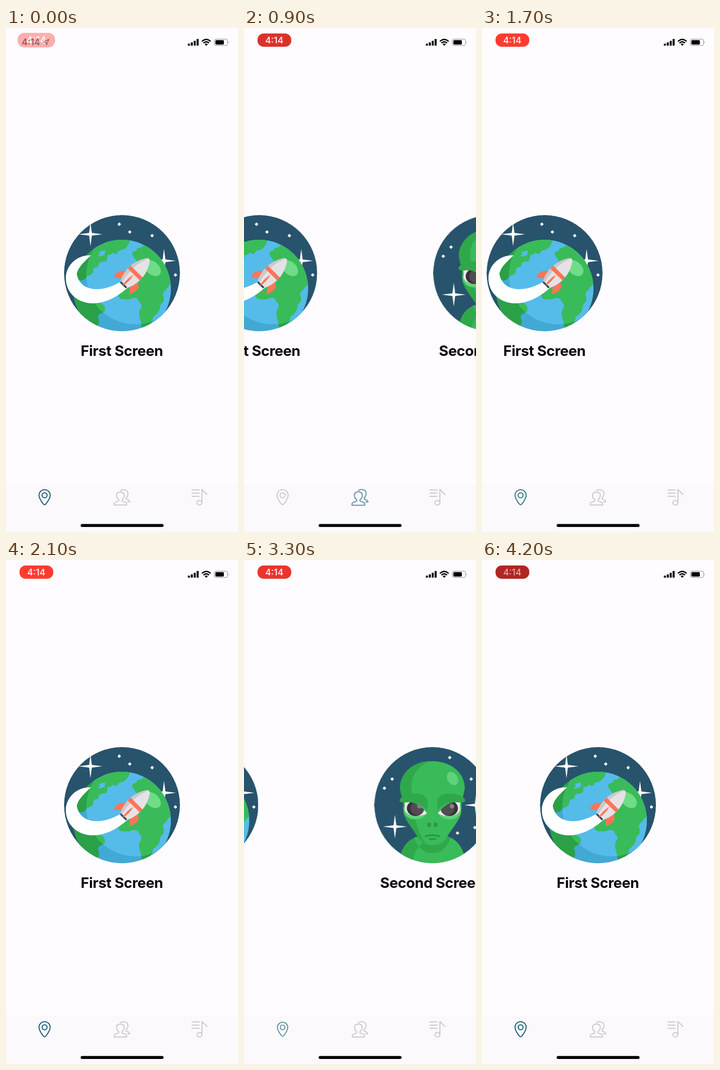
Write an HTML page that moves like this. It is 508 px wide and 1102 px high and loops after 4.3 s.

```html
<!DOCTYPE html>
<html lang="en">
<head>
<meta charset="utf-8">
<title>Tab screens</title>
<style>
html, body { margin: 0; height: 100%; overflow: hidden; background: #fefcff; }
svg { display: block; width: 100vw; height: 100vh; }
text { font-family: Inter, "Liberation Sans", sans-serif; text-anchor: middle; }
.title { font-size: 31.6px; font-weight: 700; letter-spacing: -.42px; fill: #08060b; }
.time { font-size: 19.6px; font-weight: 500; }

#strip { animation: slide 4.3s infinite; }
@keyframes slide {
  0%, 18.88% { transform: translateX(0); }
  26.8%, 35.9% { transform: translateX(-508px); }
  43.7%, 55.2% { transform: translateX(0); }
  63%, 73.75% { transform: translateX(-1016px); }
  81.65%, 100% { transform: translateX(0); }
}

.icon {
  --on: #07536a; --off: #c6c5ca; --press: #ededf1;
  fill: none; stroke: currentColor; stroke-width: 2;
  stroke-linecap: round; stroke-linejoin: round; color: var(--off);
  transform-box: fill-box; transform-origin: center;
  animation: 4.3s cubic-bezier(.2, .6, .4, 1) infinite;
}
#pin { animation-name: pin; }
#people { animation-name: people; }
#music { animation-name: music; animation-timing-function: linear; }
@keyframes pin {
  0%, 18.6% { color: var(--on); transform: scale(1); }
  18.7%, 32% { color: var(--off); transform: scale(1); }
  33.5%, 35.8% { color: var(--press); transform: scale(1); }
  43.7%, 55.2% { color: var(--on); transform: scale(1); }
  55.3%, 71% { color: var(--off); transform: scale(1); }
  72.5%, 73.4% { color: var(--press); transform: scale(1); }
  76.7% { color: #4a8490; transform: scale(.93); }
  81.4%, 100% { color: var(--on); transform: scale(1); }
}
@keyframes people {
  0%, 15% { color: var(--off); transform: scale(1); }
  16.5%, 18.6% { color: var(--press); transform: scale(1); }
  20.9% { color: #5a8a9c; transform: scale(1.03); }
  26.5%, 35.8% { color: var(--on); transform: scale(1); }
  35.9%, 100% { color: var(--off); transform: scale(1); }
}
@keyframes music {
  0%, 52.5% { color: var(--off); transform: scale(1); }
  54%, 55.2% { color: var(--press); transform: scale(1); }
  62.8% { color: #3f6076; transform: scale(1.05); }
  66%, 73.4% { color: var(--on); transform: scale(1); }
  73.5%, 100% { color: var(--off); transform: scale(1); }
}

#pill { transform-origin: 66.5px 26.5px; animation: enter 4.3s linear infinite; }
#pill rect { animation: glow 4.3s linear infinite; }
#pill text { animation: dim 4.3s linear infinite; }
#clock { animation: leave 4.3s linear infinite; }
@keyframes enter {
  0% { opacity: .4; transform: scale(1.11); }
  4.7%, 100% { opacity: 1; transform: none; }
}
@keyframes leave { 0% { opacity: .45; } 3.5%, 100% { opacity: 0; } }
@keyframes glow {
  0%, 9% { fill: #ff3b30; }
  20.9% { fill: #da322a; }
  34.9%, 49% { fill: #ff3b30; }
  62.8% { fill: #da322a; }
  76.7% { fill: #e8362d; }
  97.7%, 100% { fill: #b02621; }
}
@keyframes dim { 0%, 77% { fill: #fff; } 97.7%, 100% { fill: #d2b3b3; } }
</style>
</head>
<body>
<svg viewBox="0 0 508 1102">
<defs>
  <clipPath id="disc"><circle cx="254" cy="536" r="127"/></clipPath>
  <clipPath id="globe"><circle cx="254" cy="570" r="107"/></clipPath>
  <clipPath id="lit"><circle cx="283" cy="541" r="107"/></clipPath>
  <clipPath id="eye"><path d="M193 528C207 527 226 532 242 554C226 563 202 562 194 548Z"/></clipPath>
  <circle id="sky" cx="254" cy="536" r="127" fill="#28536c"/>
  <path id="star" fill="#fff" d="M0-26L3-3 26 0 3 3 0 26-3 3-26 0-3-3Z"/>
  <path id="dot" fill="#fff" d="M0-3.9L3.9 0 0 3.9-3.9 0Z"/>
  <g id="land">
    <path d="M140 545V455H275L271 466Q266 481 256 485Q246 486 244 492Q239 497 234 491L228 496Q221 494 222 501Q221 512 215 510Q206 511 203 515Q204 523 197 523Q190 524 191 533Q187 541 178 542Q172 552 163 552Z"/>
    <path d="M305 470Q298 482 288 481Q286 488 278 489Q274 494 279 500L286 510 262 556 248 572Q243 580 248 590Q252 594 262 593Q270 595 275 591Q288 587 291 598Q300 606 295 613Q289 622 293 634Q297 645 297 657L311 653Q321 645 322 632Q333 625 337 614Q336 605 345 598Q347 590 343 583Q345 575 351 572Q354 564 364 560V470Z"/>
    <path d="M140 580L160 585 200 600Q210 601 215 607Q219 615 214 621L204 626Q199 630 203 636Q206 642 201 652L190 670H140Z"/>
  </g>
  <g id="eyeSide">
    <path fill="#5fd27c" d="M191 540C190 557 200 567 217 567C229 567 238 561 242 553Z"/>
    <g clip-path="url(#eye)">
      <rect x="188" y="520" width="60" height="50" fill="#f1eef2"/>
      <ellipse cx="217" cy="543" rx="19" ry="17" fill="#353136"/>
      <ellipse cx="221" cy="543" rx="15" ry="15" fill="#514c51"/>
    </g>
    <path fill="#2fa84b" d="M182 526C184 518 191 515 200 513C219 508 237 511 242 522C245 529 244 538 242 547C232 533 212 529 198 530C190 531 183 530 182 526Z"/>
  </g>
</defs>

<rect width="508" height="1102" fill="#fefcff"/>

<g id="strip">
  <g>
    <g clip-path="url(#disc)">
      <use href="#sky"/>
      <use href="#star" x="185" y="451"/>
      <use href="#star" x="346" y="509"/>
      <use href="#dot" x="248" y="429"/>
      <use href="#dot" x="271" y="446"/>
      <use href="#dot" x="320" y="454"/>
      <use href="#dot" x="371" y="540"/>
      <g clip-path="url(#globe)">
        <rect x="140" y="460" width="230" height="220" fill="#42a9d4"/>
        <use href="#land" fill="#2aa147"/>
        <g clip-path="url(#lit)">
          <rect x="140" y="460" width="230" height="220" fill="#55bbe9"/>
          <use href="#land" fill="#39bb59"/>
        </g>
        <path fill="#55bbe9" d="M203 490L217 486 216 496 205 500 201 497 206 494Z"/>
      </g>
      <path fill="#fff" d="M186 497C154 496 131 520 131 547C131 580 158 602 190 602C222 602 250 583 267 567L249 556C232 566 212 572 196 571C176 570 159 560 155 538C158 522 172 511 186 497Z"/>
      <ellipse cx="321" cy="525" rx="21" ry="14" transform="rotate(43 321 525)" fill="#6fdc87"/>
      <g transform="translate(258 561) rotate(-45.5)">
        <g fill="#fc7558">
          <path d="M8-12L-5-26Q3-31 14-28L25-18Z"/>
          <path d="M8 12L-7 23Q6 31 18 28L27 17Z"/>
        </g>
        <path fill="#34495a" d="M-3-9H3V9H-3Z"/>
        <path fill="#e5e2e6" d="M1-11C20-20 48-24 76-5Q82 0 76 5C48 24 20 20 1 11Z"/>
        <path fill="#cbc8cc" d="M1-11C20-20 48-24 76-5L79-1C52-14 26-12 1-6Z"/>
        <path fill="#fc7558" d="M31-18.500L40-18.500V18.500L31 18.500Z M-5 0Q12-5 30 0Q12 5-5 0Z"/>
      </g>
    </g>
    <text class="title" x="253.700" y="716.500">First Screen</text>
  </g>

  <g transform="translate(508)">
    <g clip-path="url(#disc)">
      <use href="#sky"/>
      <use href="#star" x="172" y="583"/>
      <use href="#star" x="350" y="536"/>
      <use href="#dot" x="292" y="432"/>
      <use href="#dot" x="166" y="479"/>
      <use href="#dot" x="149" y="499"/>
      <use href="#dot" x="339" y="479"/>
      <use href="#dot" x="347" y="585"/>
      <use href="#dot" x="309" y="597"/>
      <path fill="#39bb59" d="M184 670V646C190 622 206 608 225 604H285C303 608 319 624 324 648V670Z"/>
      <path fill="#2fa84b" d="M184 670V646C190 622 206 608 225 604L240 612C222 626 211 642 210 670Z M214 606C220 628 236 641 254 641C273 641 288 628 294 606Z"/>
      <path fill="#39bb59" d="M183 500C183 464 214 440 254 440C294 440 325 464 325 500L318 530 317 554C312 572 293 592 284 609C272 628 236 628 224 609C215 592 196 572 191 554L190 530Z"/>
      <path fill="#2fa84b" d="M183 500C183 464 214 440 248 440C224 450 208 470 208 495Q208 512 216 532L216 565C222 585 224 600 240 620Q230 617 224 609C215 592 196 572 191 554L190 530Z"/>
      <use href="#eyeSide"/>
      <use href="#eyeSide" transform="matrix(-1 0 0 1 508 0)"/>
      <circle cx="225.500" cy="538.500" r="5" fill="#858085"/>
      <circle cx="297" cy="538.500" r="5" fill="#858085"/>
      <ellipse cx="298" cy="478" rx="11" ry="15.500" transform="rotate(-32 298 478)" fill="#5fd27c"/>
      <g fill="#299844">
        <ellipse cx="247" cy="579" rx="4" ry="5.500"/>
        <ellipse cx="261" cy="579" rx="4" ry="5.500"/>
      </g>
      <path fill="none" stroke="#299844" stroke-width="4" stroke-linecap="round" d="M239 604Q254 599 269 604M248 610H260"/>
    </g>
    <text class="title" x="253.500" y="716.500">Second Screen</text>
  </g>

  <g transform="translate(1016)">
    <use href="#sky"/>
    <use href="#star" transform="translate(317 466) scale(.92)"/>
    <use href="#star" transform="translate(171 466) scale(.62)"/>
    <use href="#star" transform="translate(209 622) scale(.6)"/>
    <use href="#dot" x="193" y="454"/>
    <use href="#dot" x="298" y="480"/>
    <use href="#dot" x="152" y="552"/>
    <use href="#dot" x="361" y="541"/>
    <use href="#dot" x="265" y="626"/>
    <path fill="#cdc9ce" d="M188 485L168 502Q161 511 167 520L203 557 220 530Z"/>
    <path fill="#eeecf0" d="M174 528L184 519 190 525 180 534Z"/>
    <path fill="#dedbe0" d="M240 517L271 507 277 487 294 492 286 522 262 536Z"/>
    <path fill="#f2f0f4" d="M238 516L270 507 286 522 262 537Z"/>
    <path fill="#fc7558" d="M276 490L271 479Q270 474 276 475Q278 465 287 465Q297 467 297 478L294 493Z"/>
    <path fill="#dedbe0" d="M258 588L283 566 306 597 283 611Z"/>
    <path fill="#c9c5ca" d="M278 607L302 585 306 600Q317 595 323 603L296 629Z"/>
    <path fill="#fc7558" d="M295 628L320 602 326 607 300 633Z"/>
    <path fill="#c9c5ca" d="M301 560L324 540 327 549Q340 546 346 556L319 580Z"/>
    <path fill="#fc7558" d="M318 579L343 552 349 557 323 584Z"/>
    <path fill="#f2f0f4" d="M202 520L244 514 268 530Q285 527 301 530Q317 533 325 542L305 563 296 560Q290 592 256 593Q246 593 238 583L202 566Z"/>
    <path fill="#dedbe0" d="M226 525L242 514 283 554 274 568 240 558Z"/>
    <ellipse cx="300" cy="537" rx="12" ry="6.500" fill="#fc7558"/>
    <path fill="#f6f4f8" d="M200 518H227V552H243V580H218Q200 578 200 562Z"/>
    <path fill="#dedbe0" d="M216 556Q219 552 241 552L242 580H217Z"/>
    <path fill="#fc7558" d="M201 560Q213 559 218 571L217 579Q202 578 200 566Z M240 577V555L238 551Q240 546 247 550Q251 543 254 552Q262 556 261 566Q261 578 240 580Z"/>
    <circle cx="211" cy="495.500" r="29.500" fill="#f2f0f4"/>
    <ellipse cx="209" cy="492" rx="25.500" ry="21" transform="rotate(-14 209 492)" fill="#55bbe9"/>
    <ellipse cx="225" cy="490" rx="5.500" ry="8" fill="#8fcdeb"/>
    <text class="title" x="253.700" y="716.500">Third Screen</text>
  </g>
</g>

<rect y="996" width="508" height="106" fill="#fbf9fc"/>
<g class="icon" id="pin">
  <path d="M84.500 1042.500C82 1042.500 72.300 1029 72.300 1021.700A12.200 12.200 0 0 1 96.700 1021.700C96.700 1029 87 1042.500 84.500 1042.500Z"/>
  <circle cx="84.500" cy="1021.700" r="5.500"/>
</g>
<g class="icon" id="people">
  <path d="M237 1043V1040C237 1036 244 1036 247 1034V1031C242 1028 242 1024 242 1021.500C242 1012 259 1012 259 1021.500C259 1024 259 1028 254 1031V1034C257 1036 264 1036 264 1040V1043Z"/>
  <path d="M251 1011.500C255 1008 267 1008.500 267 1018C267 1021 266 1025 263 1027V1030C266 1031 271 1032 271 1036H266"/>
</g>
<g class="icon" id="music">
  <path d="M407 1010H423M407 1017H423M407 1024H423M429 1038V1009L440 1020"/>
  <ellipse cx="423.500" cy="1038" rx="5.500" ry="5"/>
</g>
<rect x="163.500" y="1084.500" width="181.500" height="6.500" rx="3.250"/>

<g id="pill">
  <rect x="29.500" y="12" width="74" height="29" rx="13.500"/>
  <text class="time" x="66.300" y="33.300">4:14</text>
</g>
<g id="clock">
  <text class="time" x="54.500" y="38.300" style="font-weight:600">4:14</text>
  <path d="M93.500 25L82.500 30.500 88 31.500 89 37Z" fill="none" stroke="#000" stroke-width="1.500"/>
</g>

<path d="M398.200 34.200h4.400v4.400h-4.400zM404.600 31.500h4.400v7.100h-4.400zM411 28h4.400v10.600h-4.400zM417.400 24h4.400v14.600h-4.400z"/>
<path d="M429 29.200Q438.500 20.700 448 29.200M432.400 32.900Q438.500 27.500 444.600 32.900" fill="none" stroke="#000" stroke-width="2.800"/>
<path d="M435 35.300Q438.500 32.500 442 35.300L438.500 39Z"/>
<rect x="456.300" y="24.300" width="28.800" height="14" rx="4" fill="none" stroke="#99979c" stroke-width="1.300"/>
<rect x="458.500" y="26.500" width="18.500" height="9.700" rx="2"/>
<path d="M486.800 29Q489 31.300 486.800 33.700Z" fill="#99979c"/>
</svg>
</body>
</html>
```
